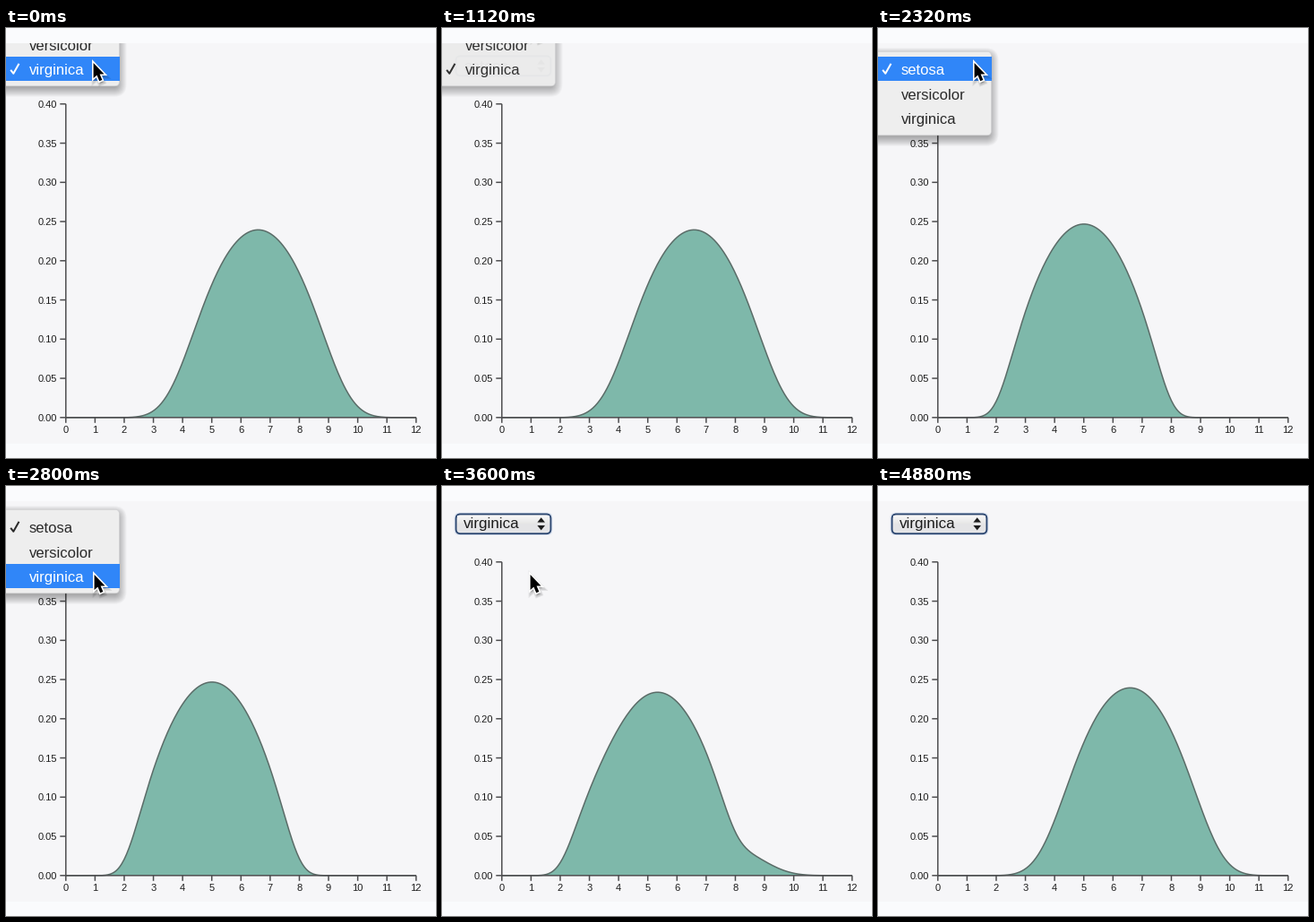
A matplotlib script for the animation above (5040 ms loop, 480 px wide and 480 px high).

```python
import matplotlib.pyplot as plt
import numpy as np
from matplotlib.animation import FuncAnimation
from matplotlib.patches import FancyBboxPatch, Polygon, Rectangle

SIZE, DPI = 480, 96
FRAMES, STEP = 63, 80
FONT = "Liberation Sans"
PAGE, PANEL = "#fafbfd", "#f6f6f8"
INK, TEAL, EDGE, BLUE = "#4c4c4e", "#7eb8aa", "#5a6b67", "#3086f8"
TOP, BOTTOM = 17, 464
X0, Y0, X_UNIT, Y_UNIT = 66.8, 434.8, 391 / 12, 875
SPECIES = ["setosa", "versicolor", "virginica"]
ROW = 27.5
MORPH = 750
POINTER_END = 4240
ARROW = 0.92 * np.array([(0, 0), (0, 18.5), (4.2, 14.8), (7.2, 22),
                         (10.6, 20.6), (7.6, 13.6), (13, 13.6)]) + (0.6, 1)

fig = plt.figure(figsize=(SIZE / DPI, SIZE / DPI), dpi=DPI, facecolor=PAGE)
ax = fig.add_axes([0, 0, 1, 1])
ax.set(xlim=(0, SIZE), ylim=(SIZE, 0))
ax.axis("off")


def pt(px):
    return px * 72 / DPI


def label(x, y, text, size, z, color="#1c1c1c", ha="left", alpha=1):
    return ax.text(x, y, text, fontsize=pt(size), family=FONT, color=color,
                   ha=ha, va="baseline", zorder=z, alpha=alpha)


def line(xs, ys, width, z, color=INK, alpha=1):
    return ax.plot(xs, ys, color=color, lw=pt(width), zorder=z, alpha=alpha,
                   snap=False, solid_capstyle="butt")[0]


def box(x0, y0, x1, y1, radius, z, **style):
    style = {"lw": 0, **style}
    return ax.add_patch(FancyBboxPatch(
        (x0, y0), x1 - x0, y1 - y0, zorder=z,
        boxstyle=f"round,pad=0,rounding_size={radius}", **style))


def rect(x0, y0, x1, y1, z, color, alpha=1):
    return ax.add_patch(Rectangle((x0, y0), x1 - x0, y1 - y0, fc=color,
                                  lw=0, zorder=z, alpha=alpha))


def shape(points, z, **style):
    style = {"lw": 0, **style}
    return ax.add_patch(Polygon(points, zorder=z, **style))


def density(mean, deviation):
    """Epanechnikov estimate, bandwidth 3, of a normal sample."""
    z = np.linspace(-2.65, 2.65, 120)
    weights = np.exp(-z * z / 2)
    v = (grid[:, None] - mean - deviation * z) / 3
    kernel = 0.25 * np.clip(1 - v * v, 0, None)
    return kernel @ weights / weights.sum()


def progress(ms, start, end):
    return np.clip((ms - start) / (end - start), 0, 1)


def cubic_in_out(t):
    return 4 * t ** 3 if t < 0.5 else 1 - 4 * (1 - t) ** 3


def draw_axes():
    line([X0, X0], [Y0 - 350, Y0], 1.5, 4)
    line([X0, X0 + 391], [Y0, Y0], 1.5, 4)
    for i in range(9):
        y = Y0 - i * 0.05 * Y_UNIT
        line([X0 - 6.5, X0], [y, y], 1.5, 4)
        label(57.5, y + 4, f"{i * 0.05:.2f}", 11.1, 4, ha="right")
    for i in range(13):
        x = X0 + i * X_UNIT
        line([x, x], [Y0, Y0 + 6], 1.5, 4)
        label(x, 452, str(i), 11.1, 4, ha="center")


def draw_select():
    box(13.6, 29.6, 123.4, 55, 6, 5, fc="#c9d6ea", alpha=0.6)
    box(15.6, 31.4, 121.4, 53.2, 5, 5, fc="#e4e4e6", ec="#2b4670", lw=pt(1.8))
    for i in range(9):
        rect(17, 33 + i, 120, 34 + i, 5, str(0.97 - 0.008 * i))
    for tip, base in ((35.2, 40.6), (49.4, 44)):
        shape([(110.7, tip), (106.4, base), (115, base)], 6, fc="#1c1c1c")


def draw_menu(top, hover, checked, alpha):
    """top is the upper edge of the first row."""
    y0, y1 = top - 6.5, top + 3 * ROW + 4.5
    parts = [box(-10 - s, y0 + 4 - s, 126.5 + s, y1 + 4 + s, 6 + s, 7,
                 fc="black", alpha=0.03 * alpha) for s in range(-2, 9)]
    parts.append(box(-10, y0, 126.5, y1, 5, 8, fc="#eeeeee", ec="#cfcfd1",
                     lw=pt(0.6), alpha=alpha))
    for i, name in enumerate(SPECIES):
        y = top + i * ROW
        color = "white" if i == hover else "#2a2a2a"
        if i == hover:
            parts.append(rect(-2, y - 0.8, 126.5, y + ROW - 1.2, 9, BLUE, alpha))
        parts.append(label(26, y + 19.5, name, 16.6, 10, color, alpha=alpha))
        if i == checked:
            parts.append(line([5.2, 8.3, 14.5], [y + 14, y + 18, y + 7],
                              2, 10, color, alpha))
    return parts


def draw_pointer(tip):
    parts = [shape(ARROW + tip + (1, 2.5), 11, fc="black", ec="black",
                   lw=pt(w), alpha=0.08) for w in (2, 4, 6)]
    parts.append(shape(ARROW + tip, 12, fc="black", ec="white", lw=pt(3.2)))
    parts.append(shape(ARROW + tip, 13, fc="black"))
    return parts


def pointer_tip(ms):
    """Glide with an ease-out from stop to stop."""
    tip = np.array([97.0, 38.0])
    for start, end, stop in ((400, 720, (100, -8)), (1280, 1680, (104, 60)),
                             (1760, 2160, (107, 38)), (2400, 2720, (98, 98))):
        tip += (stop - tip) * (1 - (1 - progress(ms, start, end)) ** 2)
    return tip


def menu_state(ms, y):
    """Row top, hovered row, checked row and opacity, or None when closed."""
    if ms < 1280:
        top, checked, closed = 32.8 - 2 * ROW, 2, 1280
    elif 2320 <= ms < 3280:
        top, checked, closed = 32.8, 0, 3280
    else:
        return None
    alpha = 1 - progress(ms, closed - 240, closed) ** 3
    return top, (y - top) // ROW, checked, alpha


grid = np.linspace(0, 12, 301)
setosa, virginica = density(5.006, 0.35), density(6.588, 0.636)
curve_x = X0 + grid * X_UNIT

rect(0, TOP, SIZE, BOTTOM, 0, PANEL)
rect(0, 0, SIZE, TOP, 20, PAGE)
rect(0, BOTTOM, SIZE, SIZE, 20, PAGE)
draw_axes()
draw_select()
area = shape([(0, 0), (1, 0), (1, 1)], 2, fc=TEAL)
outline = line([], [], 1.5, 3, EDGE)
choice = label(24, 47.5, "", 17, 6)
live = []


def update(frame):
    ms = frame * STEP
    while live:
        live.pop().remove()

    to_setosa, to_virginica = (cubic_in_out(progress(ms, start, start + MORPH))
                               for start in (1330, 3320))
    mix = 1 - to_setosa + to_virginica
    y = Y0 - Y_UNIT * (setosa + mix * (virginica - setosa))
    area.set_xy(np.column_stack([curve_x, y]))
    outline.set_data(curve_x, y)
    choice.set_text("setosa" if 1120 <= ms < 3120 else "virginica")

    tip = pointer_tip(ms)
    menu = menu_state(ms, tip[1])
    if menu:
        live.extend(draw_menu(*menu))
    if ms < POINTER_END:
        live.extend(draw_pointer(tip))
    return []


anim = FuncAnimation(fig, update, frames=FRAMES, interval=STEP,
                     init_func=lambda: [], repeat=True, repeat_delay=0)
plt.show()
```
